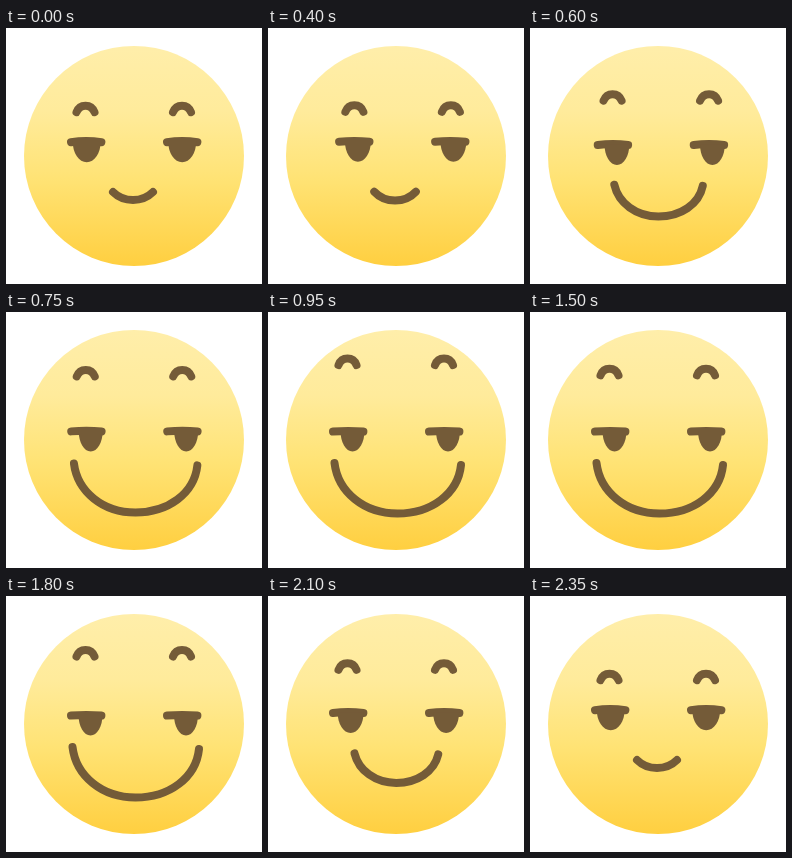
These frames come from a looping animation (256x256 px, 2500 ms). An HTML page:

```html
<!DOCTYPE html>
<html lang="en">
<head>
<meta charset="utf-8">
<title>Smirk</title>
<style>
  html, body { margin: 0; width: 100%; height: 100%; overflow: hidden; background: #fff; }
  svg { display: block; width: 100vw; height: 100vh; }
</style>
</head>
<body>
<svg viewBox="0 0 256 256">
  <defs>
    <linearGradient id="skin" x1="0" y1="0" x2="0" y2="1">
      <stop offset="0" stop-color="#ffeeaa"/>
      <stop offset="0.3" stop-color="#ffeb9b"/>
      <stop offset="0.6" stop-color="#ffe375"/>
      <stop offset="1" stop-color="#ffcf40"/>
    </linearGradient>
  </defs>
  <circle cx="128" cy="128" r="110" fill="url(#skin)"/>
  <g fill="none" stroke="#745b38" stroke-width="8" stroke-linecap="round" stroke-linejoin="round">
    <path id="mouth"/>
    <path id="browL"/>
    <path id="browR"/>
    <path id="lidL"/>
    <path id="lidR"/>
  </g>
  <g fill="#745b38">
    <path id="pupilL"/>
    <path id="pupilR"/>
  </g>
</svg>
<script>
const LOOP = 2500;
const GAP = 96.5; // distance between left and right eye
const REST = [107, 164, 112, 169, 119, 172, 127, 172, 142, 169, 147, 164];
const GRIN = [66.5, 151, 70, 180, 96, 201.5, 129.5, 201.5, 190, 182, 193, 153];

const mix = (a, b, k) => a + (b - a) * k;
const ease = (t, from, to) => {
  const k = Math.min(1, Math.max(0, (t - from) / (to - from)));
  return k * k * (3 - 2 * k);
};
const put = (id, d) => document.getElementById(id).setAttribute('d', d);

// three quick brow raises
function wiggle(t) {
  const start = 850, end = 1850;
  if (t < start || t > end) return 0;
  return (1 - Math.cos((t - start) / (end - start) * 6 * Math.PI)) / 2;
}

function brow(x, y) {
  return `M${x - 9} ${y + 6.5}C${x - 7.5} ${y + 2.5} ${x - 4} ${y} ${x} ${y}` +
    `S${x + 7.5} ${y + 2.5} ${x + 9} ${y + 6.5}`;
}

function lid(x, y, bow) {
  return `M${x - 15.2} ${y}Q${x} ${y - bow} ${x + 15.2} ${y}`;
}

function pupil(x, y, r) {
  const h = 20.5;
  return `M${x - r} ${y}C${x - r} ${y + h * 0.55} ${x - r * 0.55} ${y + h} ${x} ${y + h}` +
    `S${x + r} ${y + h * 0.55} ${x + r} ${y}Z`;
}

function draw(t) {
  const back = ease(t, 367, 800);
  const grin = back - ease(t, 1895, 2310);
  const look = ease(t, 20, 367) - back;

  const m = REST.map((v, i) => mix(v, GRIN[i], grin));
  put('mouth', `M${m[0]} ${m[1]}C${m.slice(2, 8).join(' ')}S${m.slice(8).join(' ')}`);

  const browX = 79.5 + 7 * look;
  const browY = 77.7 - 20.5 * grin - 16 * wiggle(t);
  put('browL', brow(browX, browY));
  put('browR', brow(browX + GAP, browY));

  const lidX = 80.2 + 6.2 * look;
  const lidY = 114.2 - 0.6 * look + 5.4 * grin;
  const bow = 2.6 - 1.4 * Math.max(look, grin);
  put('lidL', lid(lidX, lidY, bow));
  put('lidR', lid(lidX + GAP - 0.5, lidY, bow));

  const eyeX = 80.7 + 9.3 * look + 3.8 * grin;
  const eyeY = lidY - 0.5;
  const r = 14 - look - 2 * grin;
  put('pupilL', pupil(eyeX, eyeY, r));
  put('pupilR', pupil(eyeX + GAP - 1, eyeY, r));
}

const begin = performance.now();
function tick() {
  draw((performance.now() - begin) % LOOP);
  requestAnimationFrame(tick);
}
draw(0);
requestAnimationFrame(tick);
</script>
</body>
</html>
```
